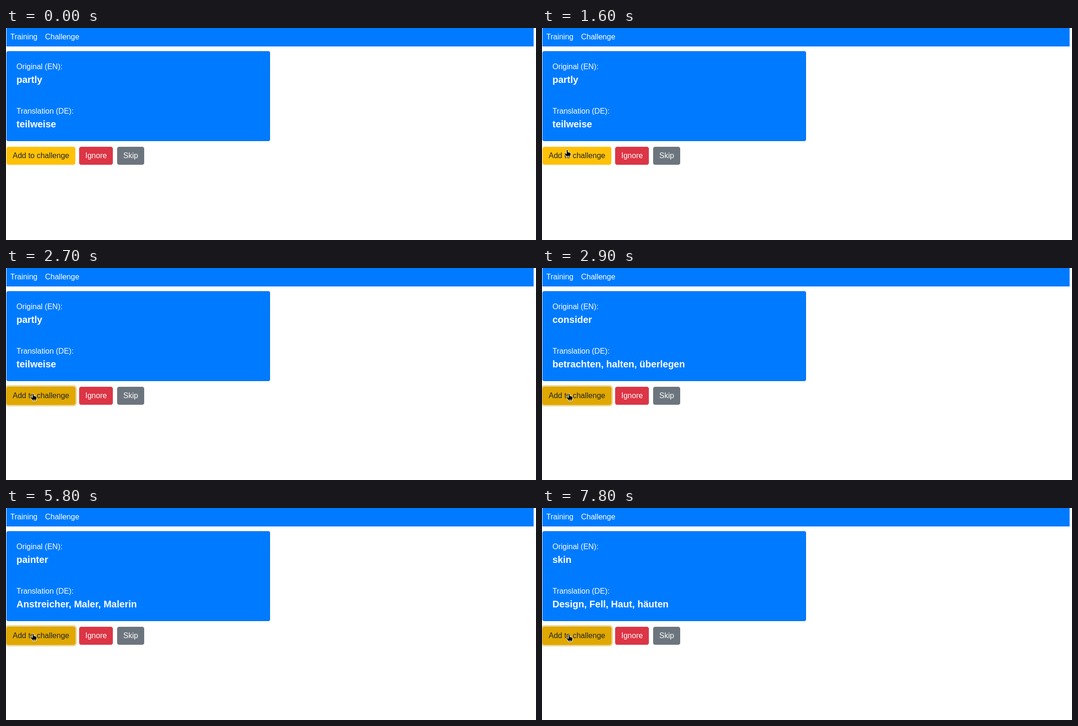
Recreate the animation shown at these times as an HTML page. Size 1116x448 px, loop 8000 ms.

```html
<!DOCTYPE html>
<html lang="en">
<head>
<meta charset="utf-8">
<title>Vocabulary training</title>
<style>
  html, body { margin: 0; width: 100%; height: 100%; overflow: hidden; background: #fff; }
  body { position: relative; font: 16px/24px "Liberation Sans", Arial, sans-serif; color: #fff; }
  nav, .card, .btn, svg { position: absolute; box-sizing: border-box; }
  nav { left: 1px; top: 0; width: 1110px; height: 39px; padding: 7px 8px; background: #007bff; }
  nav span { margin-right: 16px; float: left; }
  .card { left: 1px; top: 49px; width: 555px; height: 190px; padding: 20px;
    background: #007bff; border: 1px solid rgba(0, 0, 0, .125); border-radius: 4px; }
  .word { height: 30px; margin-bottom: 40px; font-size: 20px; line-height: 30px; font-weight: bold; }
  .btn { top: 251px; height: 38px; padding: 6px 12px; border: 1px solid; border-radius: 4px; white-space: nowrap; }
  #add { left: 1px; color: #212529; }
  #ignore { left: 154px; background: #dc3545; border-color: #dc3545; }
  #skip { left: 234px; background: #6c757d; border-color: #6c757d; }
  svg { left: 0; top: 0; width: 100%; height: 100%; }
  svg path { fill: #000; stroke: #fff; stroke-linejoin: round; }
  svg .cuff { fill: none; }
</style>
</head>
<body>
<nav><span>Training</span><span>Challenge</span></nav>
<div class="card">
  <div>Original (EN):</div>
  <div class="word" id="english"></div>
  <div>Translation (DE):</div>
  <div class="word" id="german"></div>
</div>
<div class="btn" id="add">Add to challenge</div>
<div class="btn" id="ignore">Ignore</div>
<div class="btn" id="skip">Skip</div>
<svg>
  <g id="hand">
    <path d="M-1.5 1Q0-1 1.5 1V5L6 6.2Q7.5 6.7 7.5 8.5V11L6.5 13V15.5H-1.5V13.5L-6 9Q-6.3 7.2-4.5 7.3L-1.5 9Z"/>
    <path class="cuff" d="M0 13.5H5"/>
  </g>
  <path id="arrow" d="M0 0V15L3.5 12L6 17.5L8.5 16.5L6 11H10.5Z"/>
</svg>
<script>
const LOOP = 8000;
const $ = id => document.getElementById(id);

const words = [
  [0, "partly", "teilweise"],
  [2900, "consider", "betrachten, halten, überlegen"],
  [4200, "mere", "bloß"],
  [5800, "painter", "Anstreicher, Maler, Malerin"],
  [6900, "hardly", "kaum"],
  [7800, "skin", "Design, Fell, Haut, häuten"]
];

const pointer = [
  [1200, 36, 6], [1300, 40, 66], [1400, 45, 146], [1500, 50, 220],
  [1600, 53, 257], [1700, 55, 263], [1800, 57, 265], [7800, 57, 267]
];

const buttonColors = [
  [0, "#ffc107", "#ffc107"],
  [1700, "#e6ae02", "#dca601"],
  [1800, "#e0a800", "#d39e00"]
];

const stateAt = (states, time) => states.findLast(([start]) => start <= time);

function setText(id, text) {
  if ($(id).textContent !== text) $(id).textContent = text;
}

function render(time) {
  const [, english, german] = stateAt(words, time);
  setText("english", english);
  setText("german", german);

  const [, fill, border] = stateAt(buttonColors, time);
  Object.assign($("add").style, {
    background: fill,
    borderColor: border,
    boxShadow: time >= 2700 ? "0 0 0 3.2px rgba(222, 170, 12, .5)" : "none"
  });

  const [, x, y] = stateAt(pointer, time) || [0, 0, -50];
  const overLink = y < 39 || y >= 251;
  for (const [id, shown] of [["hand", overLink], ["arrow", !overLink]]) {
    $(id).setAttribute("transform", `translate(${x} ${y})`);
    $(id).style.display = shown ? "" : "none";
  }
}

const origin = performance.now();
function tick() {
  render((performance.now() - origin) % LOOP);
  requestAnimationFrame(tick);
}
tick();
</script>
</body>
</html>
```
